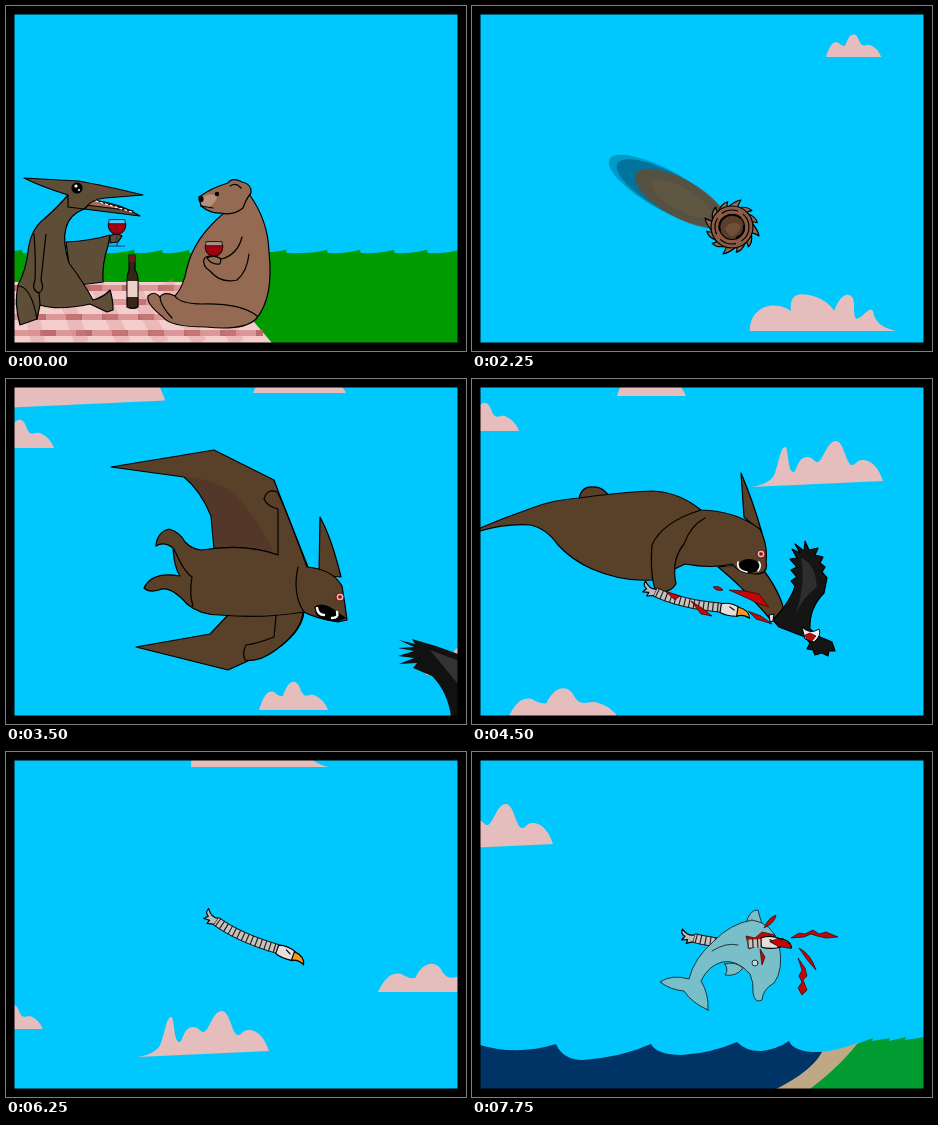
These frames come from a looping animation (460x345 px, 8000 ms). An HTML page:

```html
<!DOCTYPE html>
<html lang="en">
<head>
<meta charset="utf-8">
<title>Picnic flight</title>
<style>
html, body { margin: 0; width: 100%; height: 100%; overflow: hidden; background: #000; }
svg { display: block; width: 100vw; height: 100vh; }
.ink { stroke: #000; stroke-width: 1.2; stroke-linejoin: round; stroke-linecap: round; }
.line { fill: none; }
.cloud { fill: #e6bdbd; }
.blood { fill: #c00808; stroke: #300; stroke-width: .7; }
.ptero { fill: #5f4e37; }
.tan { fill: #956a52; }
.brown { fill: #594028; }
.sea { fill: #003366; }
</style>
</head>
<body>
<svg viewBox="0 0 460 345">
<defs>
  <path id="wide" class="cloud" d="M0 0C-1-21 21-33 41-20C39-39 51-38 63-35C75-32 83-23 84-20C89-34 97-40 102-34C106-29 102-19 106-12C113-13 119-25 123-20C125-8 133-3 146 0Z"/>
  <path id="small" class="cloud" d="M0 0C3-9 7-21 15-18Q20-13 24-14C29-31 38-33 42-19C46-11 49-16 55-15Q65-11 69 0Z"/>
  <path id="peaks" class="cloud" d="M0 0Q20-3 24-14C28-26 30-40 34-40C38-40 36-17 42-15C46-14 46-30 56-30C62-30 64-24 67-25C73-28 76-46 85-46C93-46 95-22 101-22C105-22 106-28 113-27C122-26 128-18 132-6Z"/>
  <g id="spine">
    <path class="ink" fill="#bbb" d="M14-2Q7 2 0-6Q-2-1 3 1L0 5L6 4L5 8L14 5Z"/>
    <path class="line" stroke="#111" stroke-width="10" d="M12 2Q40 7 80 0"/>
    <path class="line" stroke="#c8c2bf" stroke-width="8" d="M12.500 2Q40 7 80 0"/>
    <path class="line" stroke="#222" stroke-width="10" stroke-dasharray="1.200 3.600" d="M14 2Q40 7 80 0"/>
    <use href="#skull"/>
  </g>
  <g id="skull">
    <path class="ink" fill="#e4dedd" d="M79-4Q88-8 97-5L98 4Q88 7 80 5Z"/>
    <path class="ink" fill="#f49a1c" d="M96-5Q108-5 110 3Q104 0 97 4Z"/>
    <path class="ink line" d="M88-3L93-1"/>
  </g>
  <g id="eye">
    <circle r="4" fill="#f3b3b3" stroke="#400" stroke-width=".8"/>
    <circle r="2" fill="#b33"/><circle r=".8"/>
  </g>
  <g id="glass" class="ink">
    <path fill="#cde" fill-opacity=".35" d="M-8-7Q-11 6 0 8Q11 6 8-7Z" stroke-width=".8"/>
    <path fill="#a00010" d="M-9-3Q-9 6 0 7Q9 6 9-3Z" stroke-width=".7"/>
  </g>
</defs>

<rect width="460" height="345" fill="#00c8ff"/>
<g id="sky"></g>

<g id="land">
  <path id="grass" fill="#009b00"/>
</g>

<g id="picnic">
  <path fill="#f4cdcd" d="M8 276H214L266 337H8Z"/>
  <g class="line" stroke="#d48787" stroke-width="6">
    <path d="M8 282H218M8 296H230M8 311H243M8 327H257" opacity=".75"/>
    <path stroke="#b25c5c" stroke-dasharray="16 20" d="M8 282H218M16 296H230M24 311H243M34 327H257" opacity=".7"/>
    <path stroke-width="14" opacity=".28" d="M20 276L32 337M54 276L76 337M90 276L118 337M125 276L156 337M160 276L194 337M195 276L232 337"/>
  </g>
  <g class="ink ptero">
    <path d="M60 236Q84 235 104 229L102 240Q96 257 97 276L66 280Z"/>
    <path d="M62 189Q50 203 38 213Q24 224 22 246Q20 264 12 279Q8 298 14 319L31 313L34 299Q52 305 84 298L101 306L107 304Q107 293 104 284Q98 291 87 294Q78 277 63 257Q56 235 60 222Q63 209 78 203Z"/>
    <path class="line" d="M28 228Q30 255 29 274Q25 284 33 287Q39 284 35 274L40 228M12 280Q25 280 31 313M34 299L33 286"/>
    <path d="M78 203L134 210Q116 198 88 194Z"/>
    <path fill="#a86c5f" d="M84 193L127 205L104 202L80 199Z"/>
    <path d="M18 172L72 175Q96 179 137 189L99 192Q86 193 78 203L62 201L62 189Q36 181 18 172Z"/>
    <path class="line" stroke="#fff" stroke-dasharray="2 3" d="M90 195L126 206"/>
    <path class="line" stroke="#a33" d="M86 180L100 183"/>
    <circle cx="71" cy="182" r="5" fill="#000"/>
    <path d="M104 230Q110 226 116 230L112 236L104 237Z"/>
  </g>
  <circle cx="70" cy="180" r="1.600" fill="#fff"/><circle cx="73" cy="184" r="1" fill="#fff"/>
  <g id="cheers">
    <use href="#glass" x="111" y="221"/>
    <path class="line" stroke="#236" stroke-width="1.200" d="M111 229V240M103 240H119"/>
  </g>
  <g class="ink">
    <path fill="#38251a" d="M123 249H129V264Q132 268 132 274V301Q127 304 121 301V274Q121 268 123 264Z"/>
    <path fill="#ead2cb" stroke="none" d="M121.500 275H131.500V291H121.500Z"/>
    <path fill="#6d1717" stroke="none" d="M123 249H129V256H123Z"/>
  </g>
  <g class="ink tan">
    <path d="M218 207Q188 232 181 262Q177 282 169 290Q158 285 154 291Q148 284 142 290Q140 298 157 311Q164 321 200 321Q238 325 250 313Q268 292 263 246Q262 214 243 188Z"/>
    <path class="line" d="M169 290Q174 298 197 298M154 291Q154 299 166 312M196 298Q235 297 251 310"/>
    <path d="M193 191Q205 182 222 177Q226 171 236 176Q246 178 245 187Q240 193 237 202Q227 210 215 207Q205 208 195 200Z"/>
    <path fill="#b3917b" stroke="none" d="M196 191Q205 186 211 190Q211 196 202 202L195 198Z"/>
    <path class="line" d="M224 180Q230 176 235 182M195 200L207 202"/>
    <ellipse cx="195" cy="193" rx="2" ry="2.500" fill="#000"/>
    <circle cx="211" cy="188" r="1.600" fill="#000"/>
    <path d="M236 231Q232 248 216 253Q202 247 198 253Q196 260 204 265Q215 278 231 274Q241 266 243 248"/>
  </g>
  <use href="#glass" x="208" y="243"/>
  <path class="ink tan" d="M201 252Q208 248 215 253L214 258Q205 259 201 252Z"/>
</g>

<g id="whirl">
  <g id="trail">
    <ellipse cx="-74" rx="66" ry="20" fill="#00304a" opacity=".3"/>
    <ellipse cx="-70" rx="61" ry="19" fill="#00304a" opacity=".35"/>
    <ellipse cx="-59" rx="51" ry="19" fill="#6c4a2e" opacity=".8"/>
    <ellipse cx="-58" rx="33" ry="11" fill="#8a7040" opacity=".18"/>
  </g>
  <g id="ball">
    <g id="tufts" class="ink tan"></g>
    <circle class="ink" r="21" fill="#8b5b45"/>
    <circle class="ink line" r="17" stroke-dasharray="16 7"/>
    <circle class="ink" r="12.500" fill="#5c3d2b"/>
    <path class="line" stroke="#000" stroke-width="2" d="M-12 4A13 12 0 0 1 9-9M4 11Q13 8 12-2"/>
    <path fill="#71503a" d="M-7 2Q0-9 9-1Q6 9-2 9Z"/>
  </g>
</g>

<g id="glide">
  <g class="ink brown">
    <path d="M105 88L208 71L268 101L274 117L302 188L272 176Q240 165 208 170L205 137Q195 112 178 98Z"/>
    <path fill="#53382a" stroke="none" d="M180 98Q220 101 237 125Q255 145 268 174Q240 165 209 169L206 137Q196 112 180 98Z"/>
    <path d="M130 268L204 255L222 236L298 233Q296 251 275 267L222 291Z"/>
    <path d="M313 196L314 138Q326 160 335 198Z"/>
    <path d="M150 167Q151 153 163 150Q174 153 179 163Q186 170 195 171Q240 164 272 176V130Q262 128 258 120Q261 109 271 113Q276 120 301 188Q326 190 336 207Q339 225 341 241L332 243Q308 239 298 233Q256 240 214 236Q194 236 181 225Q164 206 153 211Q143 214 138 209Q146 192 174 197Q168 188 167 169Q158 162 150 167Z"/>
    <path class="line" d="M168 170Q178 193 186 198Q183 215 187 227M292 188Q286 215 298 233"/>
    <path d="M270 237L268 258Q250 265 240 266Q236 274 239 281Q255 284 276 266Q295 250 297 234"/>
    <path fill="#000" d="M309 228Q317 222 332 234L339 239Q326 246 311 236Z"/>
    <path class="line" stroke="#fff" stroke-width="2.400" d="M311 229Q312 236 318 236M326 239Q333 239 331 233"/>
  </g>
  <use href="#eye" x="334" y="218"/>
</g>

<g id="raptor">
  <path fill="#111" d="M393 261L409 265L406 260L430 267L455 276L500 290Q530 310 520 345L445 337Q441 312 426 297L407 289L411 284L393 285L408 279L392 277L408 272L392 269L408 268Z"/>
  <path fill="#333" d="M424 271L456 283V310Q438 288 424 271Z"/>
  <path class="ink" fill="#eee" d="M500 290Q480 280 474 292Q477 308 505 312Z"/>
  <path class="ink" fill="#f49a1c" d="M477 290Q464 291 465 302L478 299Z"/>
</g>

<g id="strike">
  <g class="ink brown">
    <path d="M107 120Q109 107 121 108Q131 107 138 119Z"/>
    <path d="M272 138L269 94Q281 122 290 154Z"/>
    <path d="M246 188Q270 207 299 241L313 236Q309 212 286 184Z"/>
    <path d="M-20 158L8 149Q34 138 60 129Q80 121 107 119Q150 113 180 112Q207 113 229 131Q264 132 288 150Q296 166 294 183Q297 195 283 195Q268 195 260 185Q240 190 213 185L180 201Q150 203 120 190Q100 181 86 166Q74 149 58 146Q36 144 8 152Z"/>
    <path d="M229 131Q190 143 180 166Q178 195 183 210Q196 217 204 205Q199 181 212 165Q219 146 233 139"/>
    <ellipse cx="277" cy="187" rx="10" ry="6.500" fill="#000"/>
    <path class="line" stroke="#fff" stroke-width="1.600" d="M266 183Q264 191 275 193M286 192Q290 187 287 183"/>
  </g>
  <use href="#eye" x="289" y="175"/>
  <path class="blood" d="M241 208Q247 206 251 211Q245 213 241 208ZM257 211Q274 211 287 215L297 228L285 224L277 220ZM276 232L289 237L300 245L284 240Z"/>
</g>

<g id="carcass">
  <path class="ink" fill="#151515" d="M320 170L328 174L323 165L332 172L333 162L337 171L346 169L343 176L351 178L348 184L353 188L350 193L355 199L352 214Q337 229 338 250L348 258L360 263L363 272L357 272L356 277L350 274L343 276L341 271L335 270L338 264L333 258L307 248L301 241Q319 222 323 207L319 202L325 198L319 191L325 188L318 180L325 179Z"/>
  <path fill="#2e2e2e" d="M329 179Q343 184 345 208Q330 219 324 235Q334 202 329 179Z"/>
  <path fill="#eee" stroke="#000" d="M330 248Q338 256 347 250Q350 256 342 263L333 260Z"/>
  <path class="blood" d="M333 256L338 254L344 257L340 262L335 261Z"/>
  <path class="ink" fill="#e4dedd" d="M297 236L302 235L301 242L298 243Z"/>
</g>

<g id="shore">
  <path class="sea" d="M-400 345V293H8Q45 304 84 292Q91 308 111 308Q150 305 179 292Q185 303 210 303Q240 301 265 290Q275 300 290 299Q305 297 317 289Q322 301 350 300H460V345Z"/>
  <path fill="#bfa984" d="M287 345Q338 323 350 300Q366 298 386 291Q370 330 345 345Z"/>
  <path fill="#009c32" d="M327 345Q364 319 385 292L401 286L400 289L418 286L417 289L434 285L433 288L460 284V345Z"/>
</g>

<use id="bones" href="#spine"/>

<g id="dolphin">
  <g class="ink" fill="#79bfca" style="stroke:#16282c;stroke-width:.9">
    <path d="M274 171Q278 157 286 158Q288 166 291 175Z"/>
    <path d="M236 258Q220 251 212 239Q199 238 188 230Q200 222 217 227Q222 206 242 189Q258 172 280 168Q300 171 307 192Q312 218 302 231Q291 237 290 248Q283 252 281 241Q282 231 278 222Q265 207 250 210Q236 214 229 229Q237 242 236 258Z"/>
    <path d="M253 212Q263 209 271 216Q264 225 253 223Q257 218 253 212Z"/>
    <path class="line" d="M240 199Q254 190 266 193"/>
    <circle cx="283" cy="211" r="3" fill="#b9dce0"/>
  </g>
</g>
<g id="hit">
  <g class="blood">
    <path d="M274 184L283 186L290 180L303 183L296 192L285 194L277 197Z"/>
    <path d="M292 176Q296 166 304 163Q303 171 292 176ZM288 197L293 205L290 213Z"/>
    <path d="M319 186L327 181L333 182L341 178L347 182L354 180L366 185L354 186L345 184L339 182L332 185ZM327 196Q339 202 344 218Q336 210 327 196ZM326 206L333 216L335 224L331 228L335 238L330 243L326 236L330 230L327 224L330 218Z"/>
  </g>
  <g transform="translate(210 183) rotate(5)">
    <path class="line" stroke="#c8c2bf" stroke-width="8" d="M66 3L80 1"/>
    <path class="line" stroke="#222" stroke-width="9" stroke-dasharray="1.200 3.600" d="M66 3L80 1"/>
    <use href="#skull"/>
    <path class="blood" d="M88-1L96-5L109 0L110 4L97 3Z"/>
  </g>
</g>
<path id="gore" class="blood" d="M193 212L208 217L203 221ZM219 222L230 229L240 237L229 235Z"/>

<path fill-rule="evenodd" d="M0 0H460V345H0ZM8.500 8.500V336.500H451.500V8.500Z"/>
</svg>
<script>
const LOOP = 8000, STEP = 250;
const el = {};
document.querySelectorAll("svg > [id], #trail, #ball, #tufts, #cheers, #grass").forEach(n => el[n.id] = n);

const show = (name, on) => el[name].style.display = on ? "" : "none";
const put = (name, x, y, turn = 0) =>
  el[name].setAttribute("transform", `translate(${x} ${y}) rotate(${turn})`);
const part = (t, a, b) => Math.min(1, Math.max(0, (t - a) / (b - a)));
const mix = (a, b, k) => a + (b - a) * k;

// Grass edge: a row of small curled tips.
const tips = [20, 72, 97, 132, 160, 187, 230, 284, 325, 358, 392, 425, 458];
el.grass.setAttribute("d", "M0 345V242" +
  tips.map(x => `Q${x - 12} 248 ${x} 242Q${x - 6} 243 ${x - 3} 247`).join("") + "L470 345Z");

el.tufts.innerHTML = Array.from({length: 12}, (_, i) =>
  `<path transform="rotate(${i * 30})" d="M-4-20Q3-26 9-${i % 3 ? 24 : 27}Q5-21 6-17"/>`).join("");

// Cloud sets: shape, x, y, horizontal scale, vertical scale.
const skies = {
  rise: [["wide", 277, 151, 1, 1], ["small", 353, -123, .8, .8]],
  chase: [["peaks", -52, 31, 1.6, 1.6], ["small", -21, 69, 1, 1], ["small", 247, 14, 1.35, 1],
    ["small", 253, 331, 1, 1], ["small", 420, 296, 1, 1], ["peaks", 554, 387, 1, 1], ["small", 311, 618, 1.6, 1.05]],
  fall: [["wide", 185, 15, .94, 1], ["small", 372, 240, 1.55, 1], ["small", -22, 277, .85, .85],
    ["peaks", 131, 305, 1, 1], ["peaks", 363, 518, 1, 1]]
};
for (const name in skies) {
  const g = document.createElementNS("http://www.w3.org/2000/svg", "g");
  g.innerHTML = skies[name].map(([shape, x, y, sx, sy]) =>
    `<use href="#${shape}" transform="translate(${x} ${y}) scale(${sx} ${sy})"/>`).join("");
  el.sky.append(el[name] = g);
}

function draw(ms) {
  const t = Math.floor(ms % LOOP / STEP) * STEP;
  const picnic = t < 750, rise = t >= 750 && t < 2750;
  const chase = t >= 2750 && t < 5250, fall = t >= 5250;
  const glide = chase && t < 4250, strike = t >= 4250 && t < 5250;

  show("rise", rise);
  show("chase", chase);
  show("fall", fall);
  show("picnic", picnic);
  show("land", picnic || rise);
  show("whirl", rise);
  show("glide", glide);
  show("raptor", glide && t >= 3250);
  show("strike", strike);
  show("carcass", strike);
  show("bones", t >= 4250);
  show("gore", strike && t >= 4500);
  show("shore", fall);
  show("dolphin", t >= 7500);
  show("hit", t >= 7750);

  const climb = Math.max(0, t - 1000) / 1250;
  const lift = rise ? 174 * climb : 0;
  put("rise", climb, lift);
  put("land", 0, lift);
  put("cheers", 0, t === 250 ? -2 : 0);
  put("whirl", 260, 296 - 75 * climb);
  put("trail", 0, 0, 29 * climb);
  put("ball", 0, 0, (t - 1000) * .288);

  const run = (t - 3500) / 1000;
  put("chase", -275 * run, -279 * run);
  put("glide", Math.min(0, run) * 36, Math.min(0, run) * 28);
  put("raptor", -220 * run, -130 * run);

  const lunge = (t - 4500) / STEP;
  const back = Math.max(0, lunge);
  const near = Math.min(0, lunge) * 26;
  put("strike", near - 45 * back, near * .6 - 40 * back);
  put("carcass", 24 * back, 34 * back);
  put("gore", -6 * back, -8 * back);

  const free = part(t, 4500, 5500), end = part(t, 6250, 7750);
  put("bones", mix(mix(172, 200, free), 210, end) + (t < 4500 ? near : 0),
    mix(mix(208, 162, free), 183, end), mix(mix(15, 26, free), 5, end));

  const drop = (t - 6250) / 1500;
  put("fall", -414 * drop, -420 * drop);
  put("shore", 414 * (1 - drop), 420 * (1 - drop));
  const leap = part(t, 7250, 7750);
  put("dolphin", -12 * (1 - leap), 130 * (1 - leap));
}

function tick() {
  draw(performance.now());
  requestAnimationFrame(tick);
}
tick();
</script>
</body>
</html>
```
